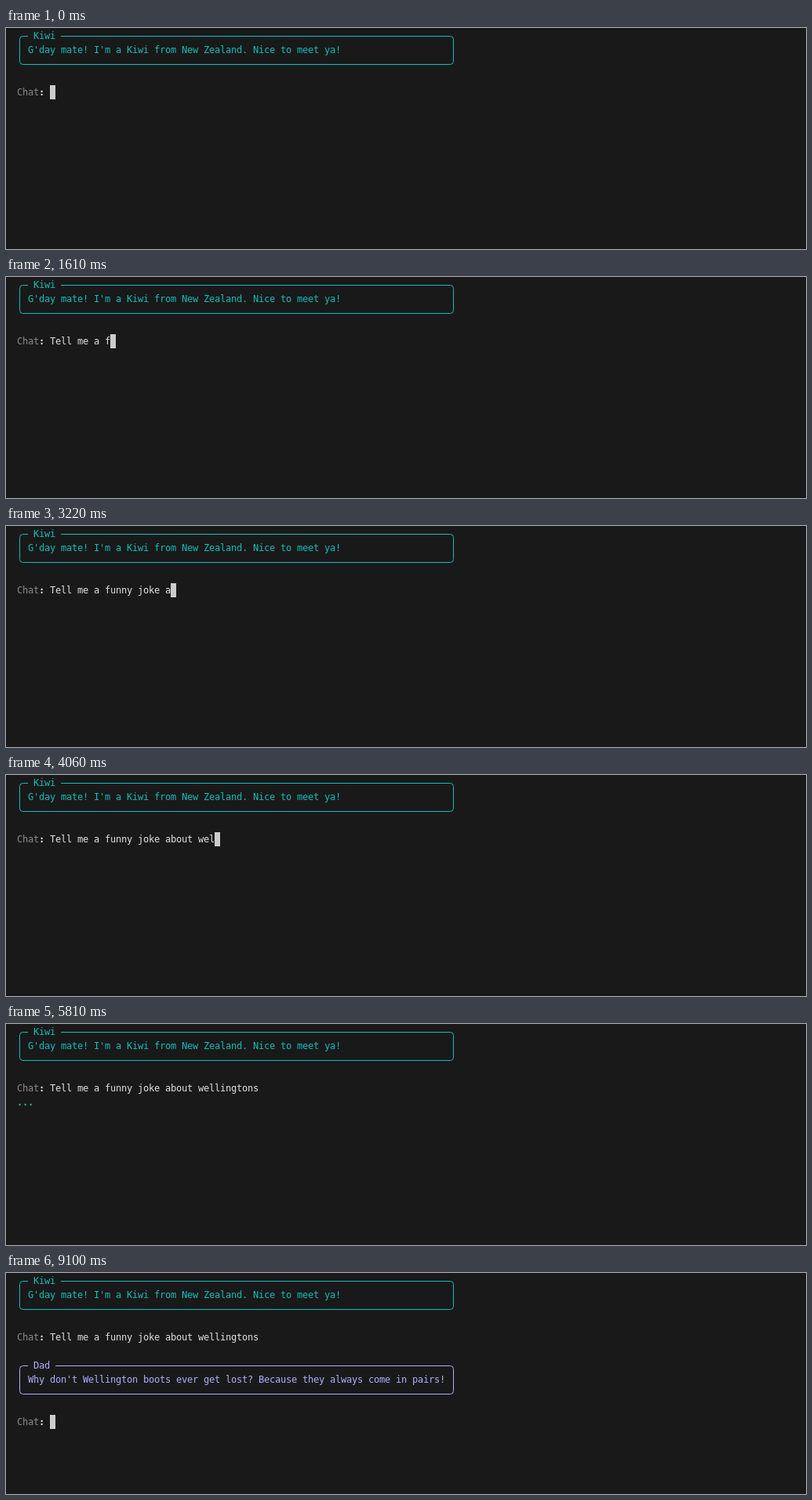
An HTML page with a canvas for the animation above (9.8 s loop, 1020 by 282 pixels).

```html
<!DOCTYPE html>
<html lang="en">
<head>
<meta charset="utf-8">
<title>Terminal chat</title>
<style>
  html, body { margin: 0; width: 100%; height: 100%; overflow: hidden; background: #191919; }
  canvas { display: block; }
</style>
</head>
<body>
<canvas id="term" width="1020" height="282"></canvas>
<script>
const ctx = document.getElementById('term').getContext('2d', { alpha: false });

const TICK = 70, LOOP = 140;              // ms per tick, ticks per loop
const LEFT = 14, TOP = 1, CELL = 7, ROW = 18, COLS = 80;
const FONT = '12px "DejaVu Sans Mono", Menlo, monospace';
const color = {
  back: '#191919', cyan: '#10bfba', violet: '#afafff', green: '#1fbf9c',
  dim: '#8c8c8c', white: '#e2e2e2', cursor: '#cccccc'
};

const question = 'Tell me a funny joke about wellingtons';
const keyTicks = [
  1, 3, 5, 7, 9, 11, 13, 14,
  17, 20, 22, 25, 27, 30,
  32, 34, 36, 37,
  42, 43, 45, 46, 48, 49, 50, 52, 53, 55, 56,
  58, 61, 63, 64, 65, 67, 68, 70, 71
];
const ENTER = 75, REPLY = 129, PROMPT = 130;

const spinner = ['.  ', '.. ', '...', ' ..', '  .', '   '];
const spinTicks = [76, 80, 83, 86, 89, 92, 95, 98, 100, 104, 107, 110, 113, 115, 119, 122, 124, 128];

const colX = col => LEFT + col * CELL;
const rowY = row => TOP + row * ROW;
const passed = (ticks, now) => ticks.filter(t => t <= now).length;

function print(text, col, row, fill, bold) {
  ctx.font = (bold ? 'bold ' : '') + FONT;
  ctx.fillStyle = fill;
  [...text].forEach((ch, i) => ctx.fillText(ch, colX(col + i), rowY(row) + 13));
}

function cursor(col, row) {
  ctx.fillStyle = color.cursor;
  ctx.fillRect(colX(col), rowY(row), CELL, ROW);
}

function panel(title, text, row, tint) {
  const l = colX(0) + 3.5, r = colX(COLS) - 3.5, r0 = 4;
  const t = rowY(row) + 9.5, b = t + 2 * ROW;
  ctx.strokeStyle = tint;
  ctx.lineWidth = 1;
  ctx.beginPath();
  ctx.moveTo(colX(2), t);
  ctx.arcTo(l, t, l, b, r0);
  ctx.arcTo(l, b, r, b, r0);
  ctx.arcTo(r, b, r, t, r0);
  ctx.arcTo(r, t, l, t, r0);
  ctx.lineTo(colX(title.length + 4), t);
  ctx.stroke();
  print(title, 3, row, tint);
  print(text, 2, row + 1, tint);
}

function prompt(row) {
  print('Chat', 0, row, color.dim);
  print(':', 4, row, color.white, true);
}

function draw(now) {
  ctx.fillStyle = color.back;
  ctx.fillRect(0, 0, 1020, 282);

  panel('Kiwi', "G'day mate! I'm a Kiwi from New Zealand. Nice to meet ya!", 0, color.cyan);

  const typed = passed(keyTicks, now);
  prompt(4);
  print(question.slice(0, typed), 6, 4, color.white);
  if (now < ENTER) cursor(6 + typed, 4);

  const spin = passed(spinTicks, now);
  if (spin && now < REPLY) print(spinner[(spin - 1) % spinner.length], 0, 5, color.green, true);

  if (now >= REPLY) {
    panel('Dad', "Why don't Wellington boots ever get lost? Because they always come in pairs!", 6, color.violet);
  }
  if (now >= PROMPT) {
    prompt(10);
    cursor(6, 10);
  }
}

const start = performance.now();
function frame() {
  draw(Math.floor((performance.now() - start) / TICK) % LOOP);
  requestAnimationFrame(frame);
}
frame();
</script>
</body>
</html>
```
